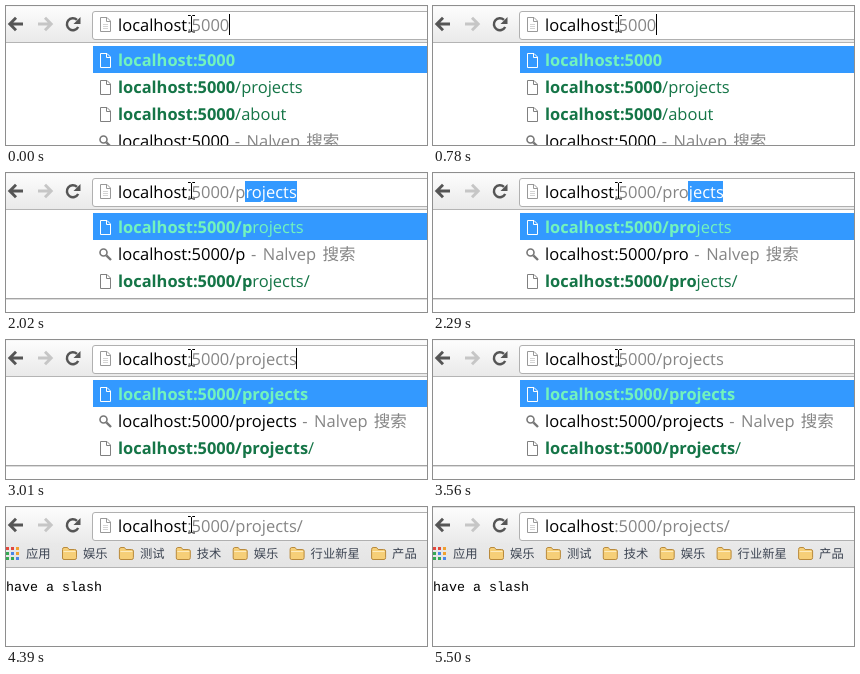
Animation, 421 px wide and 139 px high, one loop 5600 ms. Source, as an HTML page:

```html
<!DOCTYPE html>
<html lang="zh">
<head>
<meta charset="utf-8">
<title>Address bar</title>
<style>
html, body { margin: 0; width: 100%; height: 100%; overflow: hidden; background: #fff; }
svg { display: block; }
text { white-space: pre; text-rendering: geometricPrecision; font: 16.5px "Open Sans", "Noto Sans CJK SC", "Noto Sans CJK", sans-serif; }
.b { font-weight: 700; font-size: 16.45px; }
.mark { font: 12.3px "Noto Sans CJK SC", "Noto Sans CJK", sans-serif; fill: #3c4452; }
.body { font: 13.333px "Liberation Mono", monospace; fill: #000; }
</style>
</head>
<body>
<svg width="421" height="139" viewBox="0 0 421 139">
  <defs>
    <linearGradient id="bar" x1="0" y1="0" x2="0" y2="1">
      <stop offset="0" stop-color="#fdfdfd"/><stop offset="1" stop-color="#e9e9e9"/>
    </linearGradient>
    <linearGradient id="shelf" x1="0" y1="0" x2="0" y2="1">
      <stop offset="0" stop-color="#e9e9e9"/><stop offset="1" stop-color="#e4e4e4"/>
    </linearGradient>
    <path id="doc" d="M.5 .5H7L10.500 4V14.500H.5ZM6.500 .5V4.500H10.500" fill="none"/>
    <g id="lens" fill="none" stroke="#777">
      <circle cx="4.500" cy="4.500" r="3.500" stroke-width="1.600"/>
      <path d="M7.300 7.300L12 12" stroke-width="2.400"/>
    </g>
    <g id="folder" stroke="#b98a3c">
      <path d="M.5 2.500Q.5 .5 2 .5H5.500L7 2.500H12.500Q14.500 2.500 14.500 4V10.500Q14.500 12.500 13 12.500H2Q.5 12.500 .5 11Z" fill="#f6cf78"/>
      <path d="M1.500 4.500H13.500" stroke="#fdebbd"/>
    </g>
    <path id="arrow" d="M17 18H4M10 11.800L3.800 18L10 24.200" fill="none" stroke-width="2.900"/>
  </defs>

  <rect width="421" height="139" fill="#fff"/>
  <rect width="421" height="37" fill="url(#bar)"/>
  <rect id="edge" width="421" height="1"/>
  <path id="rule" d="M0 36.500H421" stroke="#b4b4b4"/>

  <g id="page">
    <rect y="36" width="421" height="25" fill="url(#shelf)"/>
    <path d="M0 60.500H421" stroke="#b4b4b4"/>
    <g id="marks"></g>
    <text id="answer" class="body" x="0" y="84">have a slash</text>
  </g>

  <use href="#arrow" stroke="#555"/>
  <use href="#arrow" stroke="#c6c6c6" transform="matrix(-1 0 0 1 49 0)"/>
  <g id="reload">
    <path d="M72.200 21A6 6 0 1 1 71 13.800" fill="none" stroke="#555" stroke-width="2.500"/>
    <path d="M74.500 11V18H67.500Z" fill="#555"/>
  </g>
  <path id="stop" d="M62 12.500L73 23.500M73 12.500L62 23.500" stroke="#555" stroke-width="3"/>

  <rect x="86.500" y="5.500" width="345" height="28" rx="2.500" fill="#fff" stroke="#b0b0b0"/>
  <use href="#doc" x="94" y="11" stroke="#999"/>
  <path d="M97 18.500H102M97 20.500H102M97 22.500H102" stroke="#d4d4d4"/>
  <rect id="pick" y="8" height="21" fill="#3399ff"/>
  <text id="url" x="112" y="25"></text>
  <rect id="caret" y="8" width="1" height="21" fill="#000"/>

  <g id="drop">
    <g id="foot">
      <path d="M0 .5H421" stroke="#a4a4a4"/>
      <path d="M0 1.500H421" stroke="#dcdcdc"/>
    </g>
    <rect x="87" y="40" width="334" height="27" fill="#3399ff"/>
    <g id="rows"></g>
  </g>

  <path id="beam" d="M182 9.500H184.500L185.500 10.500L186.500 9.500H189M185.500 10.500V25M182 26H184.500L185.500 25L186.500 26H189" fill="none" stroke="#000"/>
  <path id="pointer" d="M350.500 121.500V138L354.200 134.500L357 141H360L357.200 134H361.800Z" fill="#fff" stroke="#000"/>
</svg>
<script>
const LOOP = 5600;
const HOST = "localhost", PORT = ":5000", BASE = HOST + PORT, WORD = "projects";
const GREY = "#858585";
const $ = id => document.getElementById(id);
const show = (id, on) => $(id).setAttribute("visibility", on ? "inherit" : "hidden");
const span = (s, fill, cls = "", dx = 0) =>
  `<tspan fill="${fill}" class="${cls}" dx="${dx}">${s}</tspan>`;

// bookmark shelf
const folders = ["娱乐", "测试", "技术", "娱乐", "行业新星", "产品"];
const dots = ["#e2483d", "#e2483d", "#f0a030", "#35a853", "#4a86e8", "#f0a030", "#35a853", "#35a853", "#4a86e8"];
let shelf = dots.map((c, i) =>
  `<rect x="${i % 3 * 5}" y="${40 + (i / 3 | 0) * 5}" width="3" height="3" fill="${c}"/>`).join("");
shelf += `<text class="mark" x="20" y="51">应用</text>`;
let left = 56;
for (const name of folders) {
  shelf += `<use href="#folder" x="${left}" y="40"/><text class="mark" x="${left + 21}" y="51">${name}</text>`;
  left += 32.3 + name.length * 12.3;
}
$("marks").innerHTML = shelf;

// suggestion list: link = bold part + plain part, find = web search
const link = (bold, plain = "") => ({ bold, plain });
const find = query => ({ query });

function suggestions(path) {
  if (path.length < 2) {
    const rest = path ? "" : "/";
    return [link(BASE), link(BASE + path, rest + WORD), link(BASE + path, rest + "about"), find(BASE + path)];
  }
  const rest = WORD.slice(path.length - 1);
  return [link(BASE + path, rest), find(BASE + path), link(BASE + path, rest + "/")];
}

function rowMarkup(row, i) {
  const y = 60 + i * 27;
  const fill = i ? "#157547" : "#72f3bd";
  const body = row.query
    ? span(row.query, "#000") + span("-", GREY, "", 5.5) + span("Nalvep", GREY, "", 6.5) + span("搜索", GREY, "", 6.3)
    : span(row.bold, fill, "b") + span(row.plain, fill);
  const icon = row.query
    ? `<use href="#lens" x="93" y="${y - 12}"/>`
    : `<use href="#doc" x="94" y="${y - 13}" stroke="${i ? "#808080" : "#fff"}"/>`;
  return `${icon}<text x="112" y="${y}">${body}</text>`;
}

function typed(t) {
  if (t < 1210) return "";
  if (t < 2020) return "/";
  if (t < 2140) return "/p";
  if (t < 2290) return "/pr";
  if (t < 3010) return "/pro";
  return t < 4240 ? "/projects" : "/projects/";
}

let lastPath = null;
function setPath(path, picking) {
  if (path === lastPath) return;
  lastPath = path;
  const rest = picking ? WORD.slice(path.length - 1) : "";
  const url = $("url");
  url.innerHTML = span(HOST, "#000") + span(PORT + path, GREY) + span(rest, "#fff");
  const n = BASE.length + path.length;
  const end = Math.floor(112 + url.getSubStringLength(0, n));
  $("caret").setAttribute("x", end);
  $("pick").setAttribute("x", end);
  $("pick").setAttribute("width", rest ? Math.ceil(url.getSubStringLength(n, rest.length)) : 0);
  const rows = suggestions(path);
  $("rows").innerHTML = rows.map(rowMarkup).join("");
  $("foot").setAttribute("transform", `translate(0 ${44 + rows.length * 27})`);
}

function draw(t) {
  const loaded = t >= 3840, done = t >= 4390;
  setPath(typed(t), t >= 2020 && t < 3010);
  show("caret", t < 250 || (t >= 780 && t < 1740) || (t >= 3010 && t < 3560));
  show("drop", !loaded);
  show("rule", !loaded);
  show("page", loaded);
  show("answer", done);
  show("stop", loaded && !done);
  show("reload", !loaded || done);
  show("beam", t < 4820);
  show("pointer", t >= 4820 && t < 4940);
  $("edge").setAttribute("fill", t < 5500 ? "#f6f6f6" : "#dedede");
}

let start = null;
function tick(now) {
  if (start === null) start = now;
  draw((now - start) % LOOP);
  requestAnimationFrame(tick);
}
draw(0);
requestAnimationFrame(tick);
</script>
</body>
</html>
```
